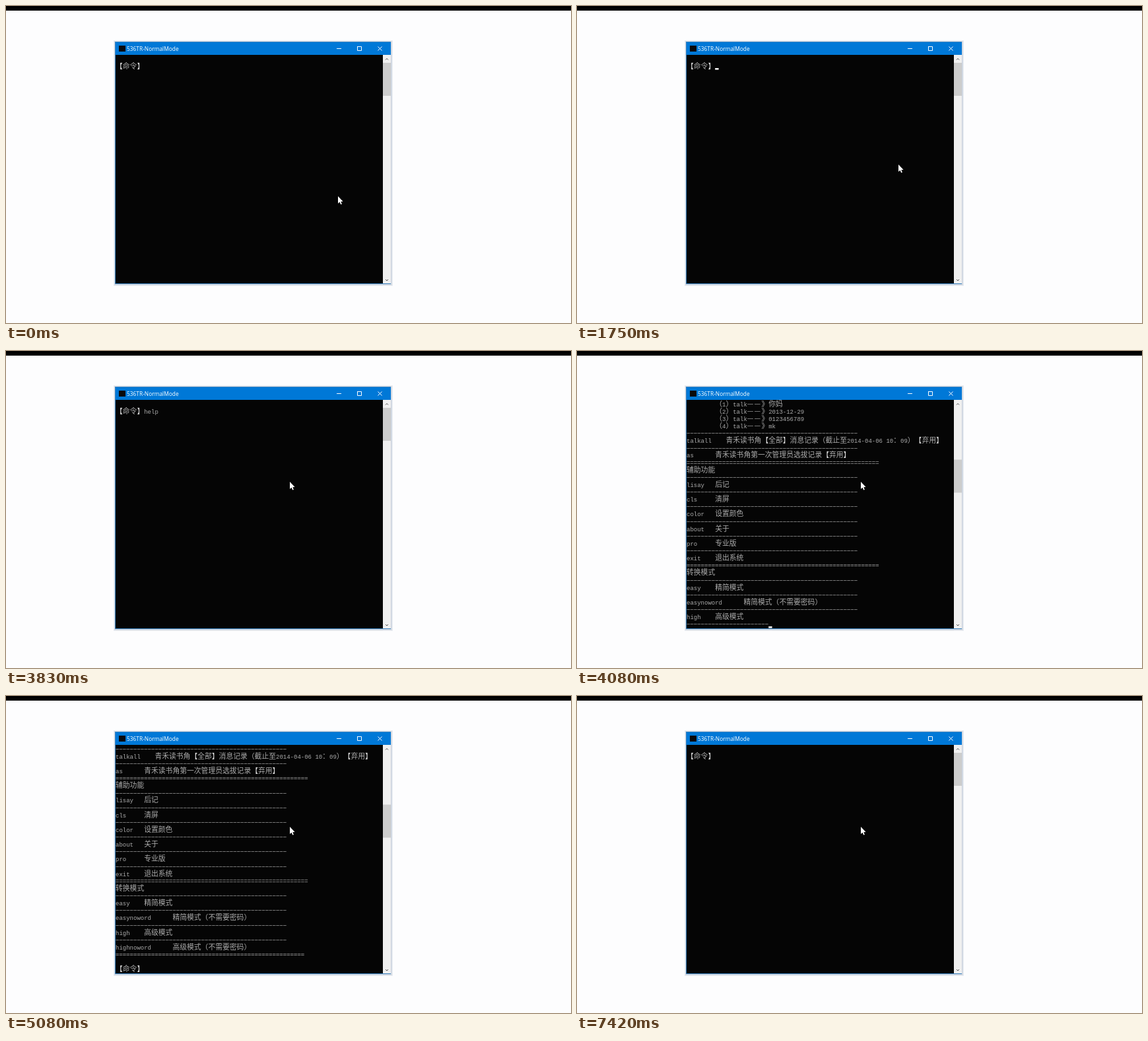
An HTML page with a canvas for the animation above (7510 ms loop, 856 by 480 pixels).

```html
<!DOCTYPE html>
<html lang="zh-CN">
<head>
<meta charset="utf-8">
<style>
  html, body { margin: 0; width: 100%; height: 100%; overflow: hidden; background: #fdfdfe; }
  canvas { display: block; }
</style>
</head>
<body>
<canvas id="stage" width="856" height="480"></canvas>
<script>
const ctx = document.getElementById('stage').getContext('2d');
const LOOP = 7510, TICK = 1000 / 12, LAST = 89;
const LEFT = 166, TOP = 74.3, CELL = 5.4, ROW = 11.12;
const BLINK = 1060, PRINT = 48, CLEAR = 78;
const PROMPT = '【命令】';
const CJK = '"Noto Sans CJK SC", "Noto Sans CJK JP", "Noto Sans CJK", sans-serif';

const dash = '-'.repeat(48), line = '='.repeat(54);
const item = (name, text) => name.padEnd(name.length < 8 ? 8 : 16) + text;
const ruled = items => items.flatMap(([name, text]) => [dash, item(name, text)]);

const help = [
  ...['你妈', '2013-12-29', '0123456789', 'mk'].map((s, i) => item('', `（${i + 1}）talk——》${s}`)),
  dash,
  'talkall    青禾读书角【全部】消息记录（截止至2014-04-06 10：09）【弃用】',
  dash,
  item('as', '青禾读书角第一次管理员选拔记录【弃用】'),
  line,
  '辅助功能',
  ...ruled([['lisay', '后记'], ['cls', '清屏'], ['color', '设置颜色'],
            ['about', '关于'], ['pro', '专业版'], ['exit', '退出系统']]),
  line,
  '转换模式',
  ...ruled([['easy', '精简模式'], ['easynoword', '精简模式（不需要密码）'],
            ['high', '高级模式'], ['highnoword', '高级模式（不需要密码）']]),
  '='.repeat(53),
  ''
];

// One letter every two ticks, the last one just before Enter
function typed(word, enter, n) {
  const left = Math.max(0, Math.floor((enter - n) / 2) - 1);
  return word.slice(0, Math.max(0, word.length - left));
}

function screenRows(n) {
  if (n < PRINT) return ['', PROMPT + typed('help', PRINT, n)];
  if (n === PRINT) return ['', PROMPT + 'help', ...help.slice(0, 18)];
  if (n === PRINT + 1) return [...help.slice(0, 30), dash.slice(0, 23)];
  if (n < CLEAR) return [...help.slice(4), PROMPT + typed('cls', CLEAR, n)];
  return ['', PROMPT];
}

function caretLit(n) {
  const printing = n === PRINT || n === PRINT + 1;
  const entering = [PRINT, CLEAR].some(enter => n < enter && n >= enter - 2);
  return printing || !entering && (n * TICK + 760) % BLINK < BLINK / 2;
}

// Quadratic curve from rest to rest
function mouseAt(n) {
  const s = Math.min(1, Math.max(0, (n - 15) / 15));
  const bend = (a, b, c) => a * (1 - s) ** 2 + 2 * b * s * (1 - s) + c * s * s;
  return [bend(503, 494, 430), bend(288, 218, 198)];
}

function box(color, x, y, w, h) {
  ctx.fillStyle = color;
  ctx.fillRect(x, y, w, h);
}

function stroke(color, ...paths) {
  ctx.strokeStyle = color;
  ctx.lineWidth = 1;
  ctx.beginPath();
  for (const p of paths) p.forEach(([x, y], i) => i ? ctx.lineTo(x, y) : ctx.moveTo(x, y));
  ctx.stroke();
}

// Draws one row on the cell grid and returns its end
function drawRow(row, y) {
  let x = LEFT;
  const isRule = row.length > 20 && /^[-=]+$/.test(row);
  for (const ch of row) {
    const wide = ch.charCodeAt(0) > 255;
    if (isRule) {
      for (const dy of ch === '-' ? [5.5] : [4, 6.5]) {
        box('#757575', x + 0.3, Math.round(y + dy), CELL - 0.8, 1);
      }
    } else if (ch !== ' ') {
      ctx.font = wide ? '10.8px ' + CJK : '9px "Liberation Mono", monospace';
      ctx.fillStyle = '【】'.includes(ch) ? '#dcdcdc' : '#ababab';
      ctx.fillText(ch, x, y + 9.2);
    }
    x += wide ? CELL * 2 : CELL;
  }
  return x;
}

function drawWindow() {
  box('#fdfdfe', 0, 0, 856, 480);
  box('#000', 0, 0, 856, 7);
  for (let r = 3; r > 0; r--) box('rgba(70, 100, 140, 0.1)', 166 - r, 55 - r, 417 + 2 * r, 366 + 2 * r);
  box('#3b83c0', 165, 54, 418, 367);
  box('#0078d7', 166, 55, 417, 19);
  box('#050505', 166, 74, 405, 346);

  box('#0a0a0a', 171, 60, 10, 9);
  ctx.font = '8.4px "Open Sans", "Noto Sans", sans-serif';
  ctx.fillStyle = '#fff';
  ctx.fillText('536TR-NormalMode', 183, 68);
  stroke('#fff', [[501, 64.5], [508, 64.5]],
    [[532.5, 61.5], [538.5, 61.5], [538.5, 67.5], [532.5, 67.5], [532.5, 61]],
    [[563.5, 61.5], [569.5, 67.5]], [[569.5, 61.5], [563.5, 67.5]]);
}

function drawScrollbar(y) {
  box('#f0f0f0', 571, 74, 12, 346);
  box('#cdcdcd', 571, y, 12, 50);
  stroke('#505050', [[575, 81.5], [577, 79.5], [579, 81.5]],
    [[575, 414], [577, 416], [579, 414]]);
}

function drawMouse(x, y) {
  const shape = [[0, 0], [0, 11], [2.5, 8.8], [4.2, 12.6], [5.9, 11.9], [4.3, 8.2], [7.6, 8]];
  ctx.beginPath();
  for (const [dx, dy] of shape) ctx.lineTo(x + dx, y + dy);
  ctx.closePath();
  ctx.strokeStyle = '#000';
  ctx.lineWidth = 1;
  ctx.stroke();
  ctx.fillStyle = '#fff';
  ctx.fill();
}

function draw(now) {
  const n = Math.min(LAST, Math.floor((now % LOOP + 4) / TICK));
  drawWindow();
  drawScrollbar(n > PRINT && n < CLEAR ? 164.5 : 86);

  const rows = screenRows(n);
  let end = LEFT;
  rows.forEach((row, i) => { end = drawRow(row, TOP + i * ROW); });
  if (caretLit(n)) {
    box('#fff', end, Math.round(TOP + (rows.length - 1) * ROW + 8.6), CELL, 2.5);
  }
  drawMouse(...mouseAt(n));
}

let start;
function tick(now) {
  start ??= now;
  draw(now - start);
  requestAnimationFrame(tick);
}
draw(0);
requestAnimationFrame(tick);
</script>
</body>
</html>
```
